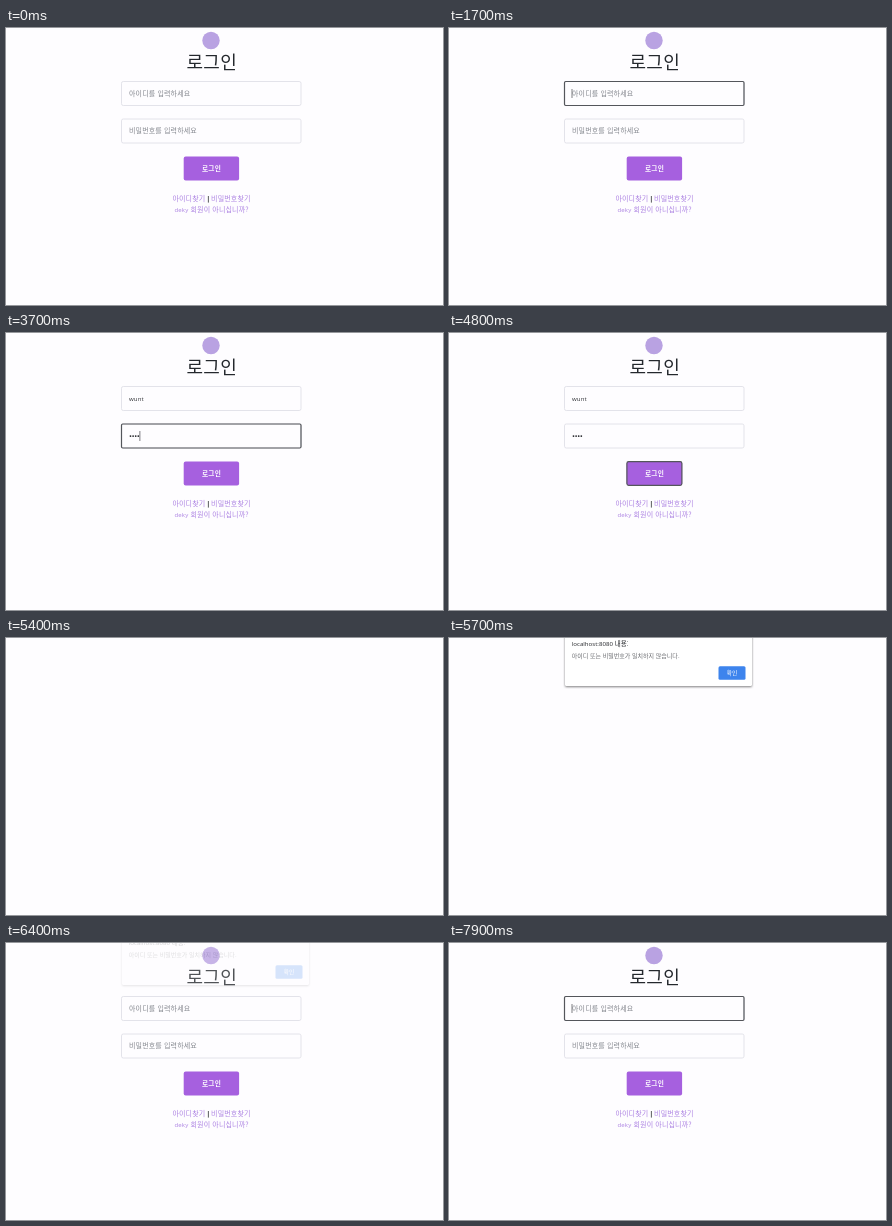
Write an HTML page that moves like this. It is 437 by 277 pixels and loops after 8 s.

```html
<!DOCTYPE html>
<html lang="ko">
<head>
<meta charset="utf-8">
<title>로그인</title>
<style>
html, body { margin: 0; width: 100%; height: 100%; overflow: hidden; background: #fefdff; }
svg { display: block; width: 437px; height: 277px; }
text { font: 7px "Noto Sans CJK KR", "Noto Sans CJK", "Noto Sans", sans-serif; letter-spacing: .02em; white-space: pre; }
.latin { font-family: "Open Sans", "Noto Sans", sans-serif; font-size: 6.1px; }
.title { font-size: 18px; font-weight: 300; fill: #24282d; }
.hint { fill: #84878e; }
.link { fill: #ac82e2; }
.mid { text-anchor: middle; }
.login { font-size: 6.7px; font-weight: 700; fill: #fff; }
.field { fill: #fefdff; stroke: #e3e3ea; }
.ring { fill: none; stroke: #54565b; stroke-width: 1.2; }
.caret { fill: #5c5e63; }
#dialog text { letter-spacing: 0; }
#sheet { filter: drop-shadow(0 1px 1.3px rgba(0, 0, 0, .5)); }
</style>
</head>
<body>
<svg viewBox="0 0 437 277">
  <rect width="437" height="277" fill="#fefdff"/>
  <g id="page">
    <circle cx="205" cy="12.5" r="8.7" fill="#b9a2e2"/>
    <text class="title mid" x="205.8" y="40.8">로그인</text>

    <rect class="field" x="115.5" y="53.5" width="179.5" height="24" rx="1.8"/>
    <rect class="ring" id="ringId" x="115.5" y="53.5" width="179.5" height="24" rx="1.2"/>
    <text class="hint" id="hintId" x="123" y="67.9">아이디를 입력하세요</text>
    <text class="latin" id="userId" x="123" y="68" fill="#303236"></text>

    <rect class="field" x="115.5" y="91" width="179.5" height="24" rx="1.8"/>
    <rect class="ring" id="ringPw" x="115.5" y="91" width="179.5" height="24" rx="1.2"/>
    <text class="hint" id="hintPw" x="123" y="105.2">비밀번호를 입력하세요</text>
    <g id="dots" fill="#222428"></g>

    <rect class="caret" id="caret" width=".8"/>

    <rect x="177.7" y="128.5" width="55.4" height="24" rx="2" fill="#a660df"/>
    <rect class="ring" id="ringBtn" x="177.9" y="128.6" width="55" height="23.8" rx="1.8"/>
    <text class="login mid" x="205.5" y="143">로그인</text>

    <text class="link" x="166.4" y="173.1">아이디찾기</text>
    <rect x="201.9" y="168" width=".8" height="6.6" fill="#303236"/>
    <text class="link" x="205.1" y="173.1">비밀번호찾기</text>
    <text class="link" x="168.4" y="183.8"><tspan class="latin">deky</tspan> 회원이 아니십니까?</text>
  </g>
  <g id="dialog">
    <rect id="sheet" x="116" y="-12" width="187" height="60" rx="1.5" fill="#fff"/>
    <text x="122.8" y="8.2" fill="#25272b" style="font-size:6.5px"><tspan class="latin">localhost:8080</tspan> 내용:</text>
    <text x="122.8" y="20.1" fill="#6a6c70" style="font-size:6px">아이디 또는 비밀번호가 일치하지 않습니다.</text>
    <rect x="269.5" y="28.3" width="27" height="13.4" rx="1.5" fill="#3d84ed"/>
    <text class="mid" x="283" y="37.1" fill="#fff" style="font-size:5.7px">확인</text>
  </g>
</svg>
<script>
const LOOP = 8000;
const $ = id => document.getElementById(id);
const show = (id, alpha) => $(id).setAttribute("opacity", +alpha);
const between = (t, a, b) => t >= a && t < b;

// latest value whose start time has passed
const at = (t, steps) => steps.reduce((v, [start, value]) => t >= start ? value : v, steps[0][1]);

for (let i = 0; i < 4; i++) {
  $("dots").insertAdjacentHTML("beforeend", `<circle cx="${124.5 + i * 2.6}" cy="103.1" r=".9"/>`);
}
const dots = [...$("dots").children];

function setCaret(x, y, h, on) {
  const c = $("caret");
  c.setAttribute("x", x);
  c.setAttribute("y", y);
  c.setAttribute("height", h);
  c.setAttribute("opacity", +on);
}

function draw(time) {
  const t = Math.floor(time / 100) * 100;
  const filled = t < 6100;
  const name = filled ? at(t, [[0, ""], [2300, "w"], [2500, "wun"], [2700, "wunt"]]) : "";
  const count = filled ? at(t, [[0, 0], [3300, 1], [3400, 2], [3500, 3], [3700, 4]]) : 0;
  const inId = between(t, 700, 3000) || t >= 6900;
  const inPw = between(t, 3000, 4700);

  $("userId").textContent = name;
  show("hintId", !name);
  show("hintPw", !count);
  dots.forEach((d, i) => d.setAttribute("opacity", +(i < count)));

  show("ringId", inId ? (t === 6900 ? 0.55 : 1) : 0);
  show("ringPw", inPw);
  show("ringBtn", at(t, [[0, 0], [4700, 0.55], [4800, 1], [5400, 0]]));

  const blink = !between(t, 1200, 1700) && !between(t, 4200, 4700) && !between(t, 7400, 7900);
  if (inPw) setCaret(count ? 123.1 + count * 2.6 : 122.6, 98, 10, blink);
  else {
    const w = name ? $("userId").getComputedTextLength() : -0.4;
    setCaret(123 + w, 61, 9, inId && blink);
  }

  show("page", !between(t, 5400, 6300));
  const alpha = at(t, [[0, 0], [5500, 0.3], [5600, 0.75], [5700, 1],
    [6100, 0.85], [6200, 0.6], [6300, 0.38], [6400, 0.2], [6500, 0.07], [6600, 0]]);
  show("dialog", alpha);
  $("dialog").setAttribute("transform", `translate(0 ${-7.5 * (1 - alpha)})`);
}

function tick() {
  draw(performance.now() % LOOP);
  requestAnimationFrame(tick);
}
tick();
</script>
</body>
</html>
```
